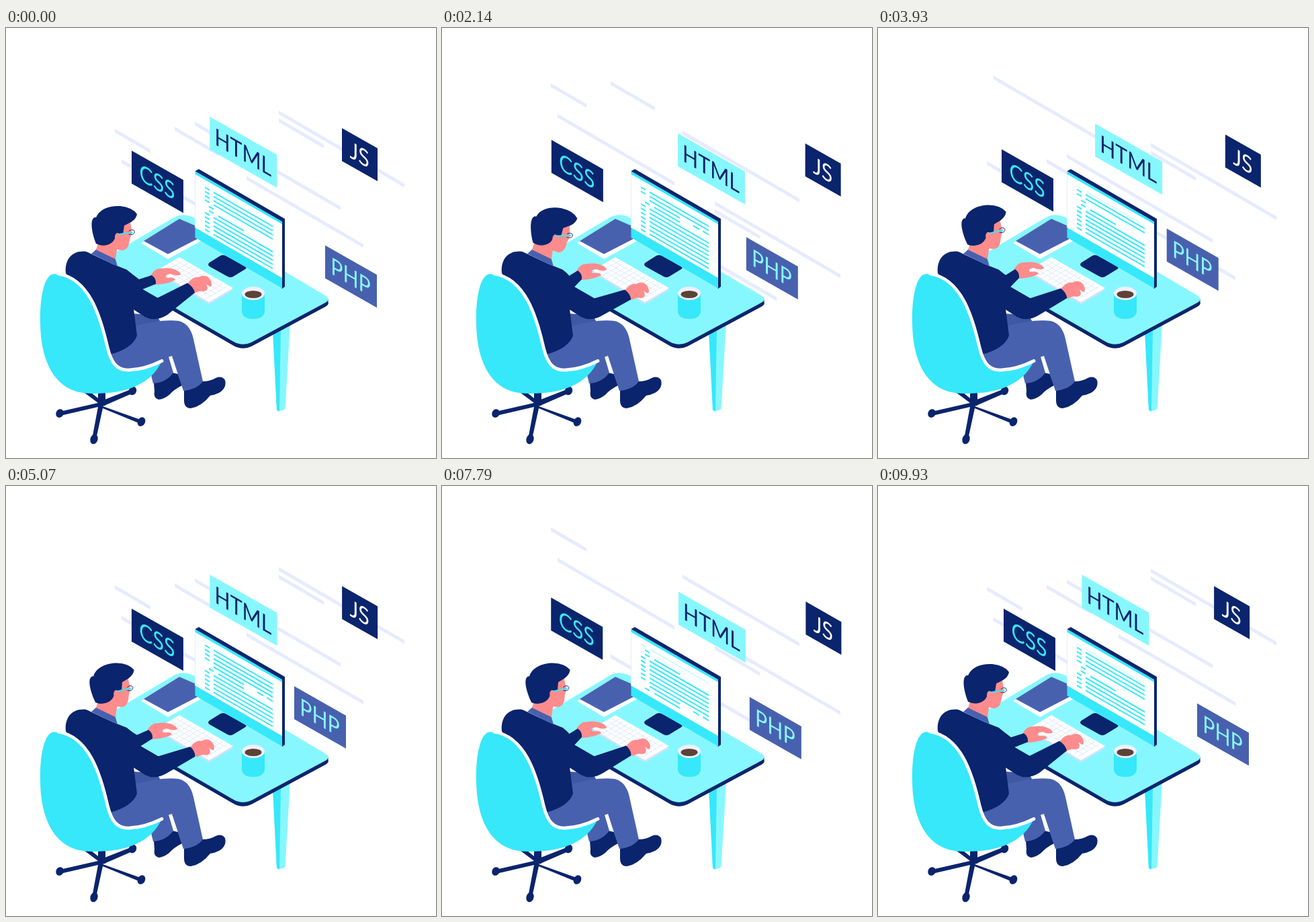
An HTML page with a canvas for the animation above (10000 ms loop, 640x640 px).

```html
<!DOCTYPE html>
<html lang="en">
<head>
<meta charset="utf-8">
<title>Developer at a desk</title>
<style>
html, body { margin: 0; width: 100%; height: 100%; overflow: hidden; background: #fff; }
canvas { display: block; width: 640px; height: 640px; }
</style>
</head>
<body>
<canvas id="stage"></canvas>
<script>
const canvas = document.getElementById('stage');
const ctx = canvas.getContext('2d');
const ratio = window.devicePixelRatio || 1;
canvas.width = canvas.height = 640 * ratio;

const NAVY = '#0a246d', BLUE = '#4861af', CYAN = '#36e8fa', PALE = '#87f7ff';
const SKIN = '#ff8c8c', MIST = '#e6ebff', WHITE = '#fff';
const LOOP = 10000, HALF = 5000, SLOPE = 0.577;

function fill(path, color) {
  ctx.fillStyle = color;
  ctx.fill(new Path2D(path));
}

function stroke(path, color, width) {
  ctx.strokeStyle = color;
  ctx.lineWidth = width;
  ctx.lineCap = ctx.lineJoin = 'round';
  ctx.stroke(new Path2D(path));
}

function ellipse(x, y, rx, ry, color, angle = 0) {
  ctx.fillStyle = color;
  ctx.beginPath();
  ctx.ellipse(x, y, rx, ry, angle, 0, Math.PI * 2);
  ctx.fill();
}

// Parallelogram with vertical ends, leaning along the isometric axis.
function slab(x, y, w, h, color, slope = SLOPE) {
  fill(`M${x} ${y}l${w} ${w * slope}v${h}l${-w} ${-w * slope}z`, color);
}

function shifted(x, y, draw) {
  ctx.save();
  ctx.translate(x, y);
  draw();
  ctx.restore();
}

// Eased value between keys of the form [time, ...values].
function track(keys, t) {
  let i = 0;
  while (i < keys.length - 2 && t >= keys[i + 1][0]) i++;
  const [a, b] = [keys[i], keys[i + 1]];
  const p = Math.min(1, Math.max(0, (t - a[0]) / (b[0] - a[0])));
  const e = p * p * (3 - 2 * p);
  return a.slice(1).map((v, n) => v + (b[n + 1] - v) * e);
}

// x, y, width, and the moment the bar jumps back below
const bars = [
  [162, 150, 53, 3120], [172, 195.5, 174, 4130], [251, 147, 66, 2480],
  [281, 139.5, 217, 1400], [406, 123, 187, 300], [406, 134.5, 67, 300],
  [358, 220.5, 174, 3300]
];
const BAR_REST = 4930;

function drawBars(t) {
  const s = t % HALF;
  for (const [x, y, w, jump] of bars) {
    const dy = s < jump ? -0.0317 * s : 0.0484 * Math.max(0, BAR_REST - s);
    slab(x, y + dy, w, 5.5, MIST, 0.582);
  }
}

const swing = [[0, 0], [2500, 1], [5000, 0]];
const labels = [
  { text: 'HTML', x: 303.3, y: 132, w: 100, dx: 50.5, dy: 26.2, bg: PALE, fg: NAVY, keys: swing, period: HALF },
  { text: 'JS', x: 500, y: 149, w: 53, dx: 43, dy: 24, bg: NAVY, fg: WHITE, keys: swing, period: HALF },
  { text: 'CSS', x: 187, y: 182.5, w: 77, dx: -25.3, dy: -16.8, bg: NAVY, fg: CYAN,
    keys: [[0, 0], [2460, 1], [2650, 1], [4280, 0], [5000, 0]], period: HALF },
  { text: 'PHP', x: 475, y: 323.5, w: 77, dx: -47, dy: -26, bg: BLUE, fg: PALE,
    keys: [[0, 0], [4450, 1], [4600, 1], [10000, 0]], period: LOOP }
];

function drawLabel(label, t) {
  const [p] = track(label.keys, t % label.period);
  shifted(label.x + label.dx * p, label.y + label.dy * p, () => {
    slab(0, 0, label.w, 49, label.bg, 0.567);
    ctx.translate(label.w / 2 - 0.5, label.w * 0.2835 + 24.5);
    ctx.transform(0.866, 0.5, 0, 1, 0, 0);
    ctx.font = '35px Lato, sans-serif';
    ctx.textAlign = 'center';
    ctx.textBaseline = 'alphabetic';
    ctx.fillStyle = label.fg;
    ctx.fillText(label.text, 0, 12.5);
  });
}

function drawDesk() {
  fill('M397 450L423 440L415.500 567Q410 571.500 403 569Z', PALE);
  fill('M397 450L409 445L407 570.500Q404 570.500 403 568Z', CYAN);
  const top = 'M150 358Q140 348 152 340L250 282Q263 275 277 281L475 398Q484 404 475 409L365 468Q352 474 339 467Z';
  shifted(0, 6, () => fill(top, NAVY));
  fill('M479.500 404v7l-8 2v-8z', NAVY);
  fill(top, PALE);
  fill('M201 320L258 284L305 309L241 344Z', WHITE);
  fill('M205 317L258 284L304 304L241 336.500Z', BLUE);
  fill('M303 349L319 339Q323 337 327 339L356 355Q359 357 356 359L338 370Q334 372 330 370L303 355Q299 352 303 349Z', NAVY);
}

const ROWS = 75, PITCH = 470 / ROWS;
const gaps = [4, 18, 32, 42, 59, 67];

function drawRow(row, y) {
  const bit = (x, w) => slab(x, y + (x - 296) * SLOPE, w, 2.3, CYAN);
  const gap = gaps.indexOf(row);
  if (gap >= 0) {
    if (gap % 2) {
      bit(309, 45);
      bit(374, 9);
      bit(388, 9);
    } else {
      bit(302, 7);
    }
  } else if (gaps.includes(row - 1)) {
    bit(302, 7);
    bit(316, gap % 2 ? 38 : 81);
  } else {
    bit(296, 7);
    bit(309, 88);
  }
}

function drawMonitor(t) {
  fill('M281.500 213L287 210L415 284V385L411 388Z', NAVY);
  fill('M281.500 213L411 288V387.500L281.500 312Z', CYAN);
  fill('M281.500 217.500L411 292V372L281.500 297Z', WHITE);
  stroke('M281.500 218V297', MIST, 0.7);
  ctx.save();
  ctx.clip(new Path2D('M296 235L398 293.900V360L296 301Z'));
  const scroll = t / LOOP * ROWS;
  for (let i = -1; i < 12; i++) {
    const n = Math.floor(scroll) + i;
    drawRow((n + ROWS) % ROWS, 236 + (n - scroll) * PITCH);
  }
  ctx.restore();
}

function drawKeyboard() {
  const body = 'M224 361L258 341L338 387L302 408Z';
  shifted(0, 3, () => fill(body, '#d7e0f8'));
  fill(body, WHITE);
  for (let i = 1; i < 5; i++) {
    stroke(`M${226 + i * 6.6} ${361.5 - i * 4}l73 42`, '#dfe9fb', 1);
  }
  for (let i = 1; i < 12; i++) {
    stroke(`M${226 + i * 6.5} ${361 + i * 3.8}l31 -18`, '#dfe9fb', 1);
  }
}

function drawCup() {
  fill('M351 394V423Q353 433 368 433Q383 433 385 423V394Z', CYAN);
  ellipse(368, 395, 17, 10, '#f1efff');
  ellipse(368, 396.5, 12.5, 5.5, '#5b4338');
}

function drawChairBase() {
  fill('M137 535H148V562H137Z', NAVY);
  fill('M142 555L188 537L190 543L144 563L203 584L200 589L144 566L134 612H128L137 564L81 577L80 571L137 558L117 543H127Z', NAVY);
  ellipse(80, 573.5, 5.5, 6.5, NAVY, 0.5);
  ellipse(188.5, 540, 5.5, 6.5, NAVY, 0.5);
  ellipse(201.5, 586, 5.5, 7, NAVY, 0.5);
  ellipse(131, 612, 5.5, 7.5, NAVY, 0.3);
}

function drawLegs() {
  fill('M220 528Q238 526 247 513L256 515Q259 524 262 532Q250 538 243 546Q234 553 227 553Q219 551 221 540Z', NAVY);
  fill('M212 500L241 486L249 513Q238 528 219 529Z', BLUE);
  fill('M188 425L222 427Q230 434 231 442L190 456Z', '#3f58a4');
  fill('M265 540L292 526Q304 526 312 521Q321 517 326 524Q329 536 317 543Q311 546 304 547Q290 564 275 566Q265 566 265 554Z', NAVY);
  fill('M154 486L194 458L192 444Q230 433 257 436Q274 440 279 463L293 526Q284 538 264 540L247 488Q226 494 205 507Q165 520 154 486Z', BLUE);
}

function drawChair() {
  const rim = 'C123 373 140 427 151 475C157 500 166 510 184 509Q207 508 232 495.500';
  fill(`M72 366${rim}C216 530 180 545 127 544C75 544 52 500 51 440C50 405 56 366 72 366Z`, CYAN);
  stroke(`M78 366${rim}`, WHITE, 4.8);
}

const farKeys = [
  [0, 0, 0], [500, -13, -8], [2140, -15, -7], [3930, -13, -9], [5070, -5, -5],
  [5700, -14, -7], [6790, -14, -5], [7790, -15, -7], [9200, -13, -7], [9800, 0, 0]
];
const nearKeys = [
  [0, 0, 0], [500, 2, 8], [2140, 2, 10], [3930, 2, 8], [5070, 4, 8.5],
  [6790, 4, 8.5], [7790, 4, 7], [9200, 3, 8], [9800, 0, 0]
];

function drawFarArm(t) {
  const [x, y] = track(farKeys, t);
  shifted(x, y, () => fill('M214 371Q220 357 231 358Q242 356 250 359Q259 362 260 367Q254 370 245 366Q235 367 239 372Q251 370 252 375Q241 381 222 382Z', SKIN));
  fill(`M160 352L180 360Q190 368 ${198 + x * 0.6} ${374 + y * 0.7}L${217 + x} ${368 + y}Q${224 + x} ${373 + y} ${223 + x} ${381 + y}L188 395L170 385Z`, NAVY);
}

function drawNearArm(t) {
  const [x, y] = track(nearKeys, t);
  shifted(x, y, () => fill('M270 381Q278 369 287 371Q296 366 302 372Q308 379 305 385Q301 384 298 381Q303 391 294 392Q288 390 280 395Z', SKIN));
  fill(`M180 378L221 404L${270 + x} ${379.5 + y}Q${279 + x * 0.5} ${385 + y} ${281 + x * 0.2} ${394 + y}L240 427Q222 438 207 430L185 416Z`, NAVY);
}

function drawTorso() {
  fill('M89 365C87 344 99 330 120 333L160 352L180 360L195 385L190 418L195 458Q188 477 155 486L140 470L100 380Z', NAVY);
  fill('M127 336L136 328L162 341L166 355Z', BLUE);
}

const nod = [
  [0, 0], [250, 0], [1000, 7], [2450, 7], [3600, -4.5], [5070, -4.5],
  [5700, 7.5], [7000, 7.5], [7750, -4.5], [8700, -4.5], [9600, 0]
];

function drawHead(t) {
  fill('M138 318L166 323L163 344L134 330Z', SKIN);
  ctx.save();
  ctx.translate(148, 332);
  ctx.rotate(track(nod, t)[0] * Math.PI / 180);
  ctx.translate(-148, -332);
  fill('M160 297L185 289Q187 299 187 307Q184 313 183 321Q181 330 173 331L163 329L140 324Z', SKIN);
  fill('M134 321C130 311 126 296 128 287Q130 281 134 282C139 269 155 264 170 265Q188 267 195 277Q194 284 186 289L176 294L174 307L163 307Q163 319 150 323Q142 325 134 321Z', NAVY);
  ellipse(166, 311, 4, 6, SKIN);
  stroke('M183 302Q187 299 190 301Q193 304 189 307Q186 308 183 307', NAVY, 0.9);
  stroke('M168 307L188 304', CYAN, 2.2);
  ctx.restore();
}

function drawFrame() {
  const t = performance.now() % LOOP;
  ctx.setTransform(ratio, 0, 0, ratio, 0, 0);
  ctx.fillStyle = WHITE;
  ctx.fillRect(0, 0, 640, 640);
  drawBars(t);
  for (const label of labels) drawLabel(label, t);
  drawDesk();
  drawMonitor(t);
  drawKeyboard();
  drawCup();
  drawChairBase();
  drawLegs();
  drawFarArm(t);
  drawTorso();
  drawNearArm(t);
  drawChair();
  drawHead(t);
  requestAnimationFrame(drawFrame);
}

drawFrame();
</script>
</body>
</html>
```
